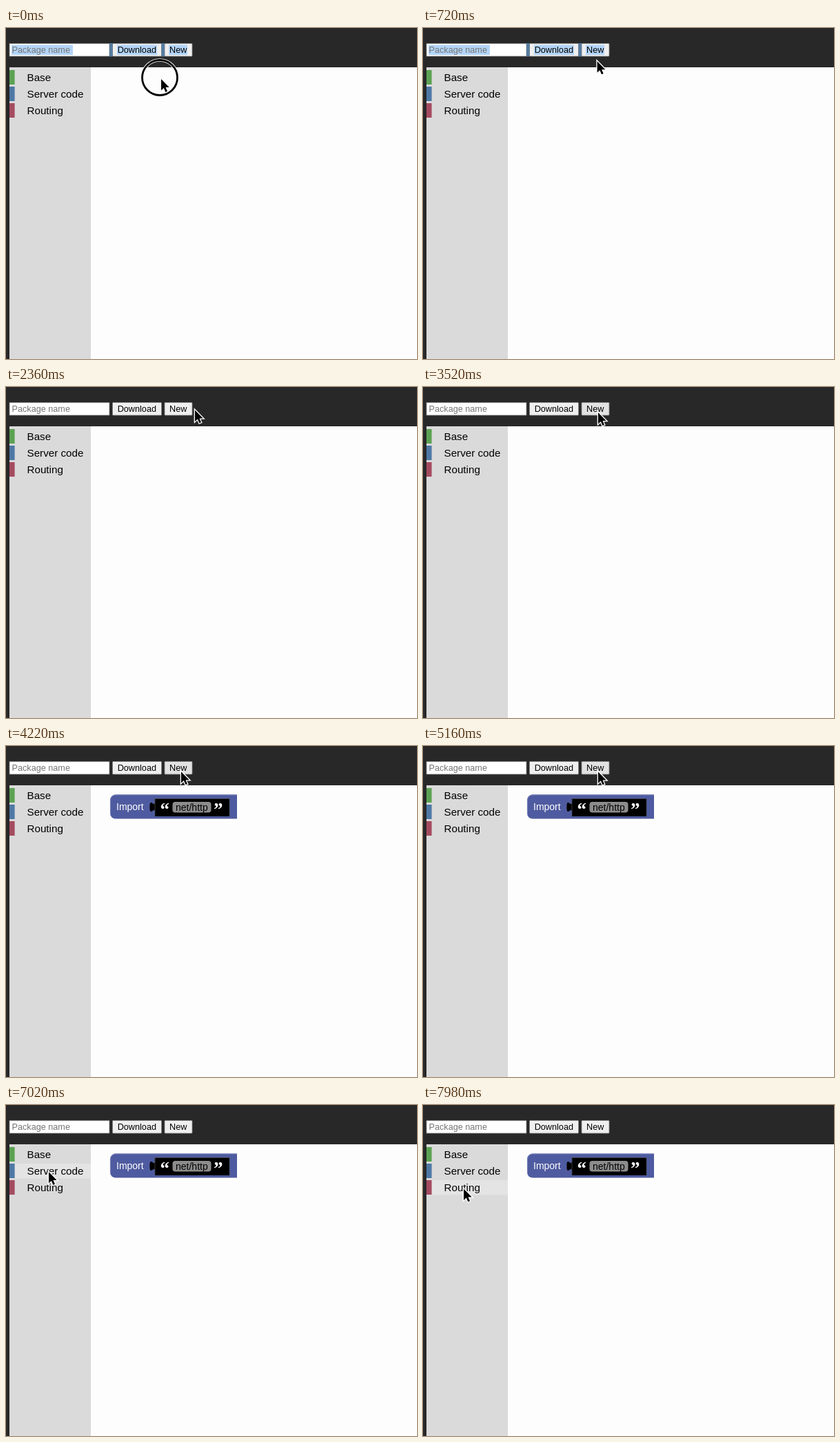
Write an HTML page that moves like this. It is 596 px wide and 480 px high and loops after 8 s.

```html
<!DOCTYPE html>
<html lang="en">
<head>
<meta charset="utf-8">
<title>Block editor</title>
<style>
  html, body { margin: 0; width: 100%; height: 100%; overflow: hidden; background: #282828; }
  svg { display: block; width: 596px; height: 480px; font-family: "Liberation Sans", Arial, sans-serif; }
  .control { font-size: 12.66px; }
  .button { fill: #efefef; stroke: #808080; stroke-width: .8; }
  .button.hover { fill: #e2e2e2; }
  .row { fill: #dadada; }
  .row.hover { fill: #e4e4e4; }
  .label { font-size: 15.2px; }
  .block { font-size: 14px; }
  .quote { font: bold 27px "Liberation Serif", "Times New Roman", serif; fill: #fff; }
</style>
</head>
<body>
<svg viewBox="0 0 596 480">
  <rect width="596" height="480" fill="#282828"/>
  <rect x="123" y="57" width="473" height="423" fill="#fdfdfd"/>
  <rect x="5" y="57" width="118" height="423" fill="#dadada"/>
  <g id="rows"></g>

  <g class="control">
    <rect x="5" y="22.5" width="145" height="18.5" fill="#fff" stroke="#767676" stroke-width=".8"/>
    <rect class="button" x="154.5" y="22.5" width="71" height="18.5" rx="1"/>
    <rect class="button" id="new" x="230" y="22.5" width="40" height="18.5" rx="1"/>
    <g id="selection">
      <path d="M150 22h4.5v19.5h-4.5zM225.5 22h4.5v19.5h-4.5z" fill="#567ca0"/>
      <path d="M8 24.5h89v14.5h-89zM161 24.5h58v14.5h-58zM236 24.5h27v14.5h-27z" fill="#b3d5f8"/>
    </g>
    <text x="8.5" y="36" fill="#757575">Package name</text>
    <text x="161.7" y="36">Download</text>
    <text x="237" y="36">New</text>
  </g>

  <g class="block" id="block">
    <path d="M159 70.5H335V105.5H159a8 8 0 0 1-8-8V78.5a8 8 0 0 1 8-8z" fill="#4f5ba0"/>
    <path d="M151.4 98V78.5a7.6 7.6 0 0 1 7.6-7.6H334.5" fill="none" stroke="#7f88bb" stroke-width=".9"/>
    <path d="M216 76.5V81c0 10-7.6-8-7.6 7.5s7.6-2.5 7.6 7.5V102H324V76.5z" fill="#000"/>
    <path d="M216 102V76.5H324V102" fill="none" stroke="#444" stroke-width=".8"/>
    <rect x="241.5" y="81" width="56" height="15.5" rx="4" fill="#8c8c8c"/>
    <text x="160" y="92.5" fill="#fff">Import</text>
    <text class="quote" x="223.5" y="101">“</text>
    <text x="246" y="93.7">net/http</text>
    <text class="quote" x="301" y="101">”</text>
  </g>

  <g id="pointer">
    <g id="ring" fill="none">
      <circle cx="-2" cy="-2" r="25.5" stroke="#fff" stroke-width="4.6"/>
      <circle cx="-2" cy="-2" r="25.5" stroke="#000" stroke-width="2.8"/>
    </g>
    <path d="M0 0V16.5L3.8 12.9L6.4 18.9L9 17.8L6.5 12H11.7Z"
          fill="#000" stroke="#fff" stroke-width="2.6" paint-order="stroke"/>
  </g>
</svg>
<script>
const LOOP = 8000;
const $ = id => document.getElementById(id);
const categories = [["Base", "#5ca253"], ["Server code", "#4f78a5"], ["Routing", "#a54c60"]];

$("rows").innerHTML = categories.map(([name, color], i) => {
  const y = 61 + 24 * i;
  return `<rect class="row" x="5" y="${y}" width="118" height="21.5"/>
    <rect x="5" y="${y}" width="7.6" height="21" fill="${color}"/>
    <text class="label" x="30.5" y="${y + 16}">${name}</text>`;
}).join("");
const rows = [...document.querySelectorAll(".row")];

// time, x, y of the pointer tip
const path = [
  [0, 225, 74], [250, 225, 74], [820, 255, 46], [1200, 279, 30], [1800, 279, 30],
  [2200, 274, 33.5], [2550, 274, 33.5], [3050, 254, 37], [5850, 254, 37.5],
  [6280, 232, 70.5], [6650, 120, 92], [7000, 62, 97], [7540, 60, 98],
  [7850, 59, 121.5], [8000, 59, 121.5]
];
const clicks = [[0, 160], [1440, 1740], [3620, 3900]];
const DESELECT = 1600, BLOCK_ADDED = 3900;

function pointerAt(t) {
  const i = path.findIndex(([time]) => time > t);
  const [t0, x0, y0] = path[i - 1], [t1, x1, y1] = path[i];
  const k = (t - t0) / (t1 - t0), ease = k * k * (3 - 2 * k);
  return [x0 + (x1 - x0) * ease, y0 + (y1 - y0) * ease];
}

const show = (id, on) => $(id).setAttribute("visibility", on ? "visible" : "hidden");

function render(t) {
  const [x, y] = pointerAt(t);
  $("pointer").setAttribute("transform", `translate(${x} ${y})`);
  show("ring", clicks.some(([start, end]) => t >= start && t < end));
  show("selection", t < DESELECT);
  show("block", t >= BLOCK_ADDED);
  $("new").classList.toggle("hover", x > 230 && x < 270 && y > 22 && y < 41);
  const active = x < 123 ? Math.floor((y - 60) / 24) : -1;
  rows.forEach((row, i) => row.classList.toggle("hover", i === active));
}

const start = performance.now();
function tick() {
  render((performance.now() - start) % LOOP);
  requestAnimationFrame(tick);
}
tick();
</script>
</body>
</html>
```
